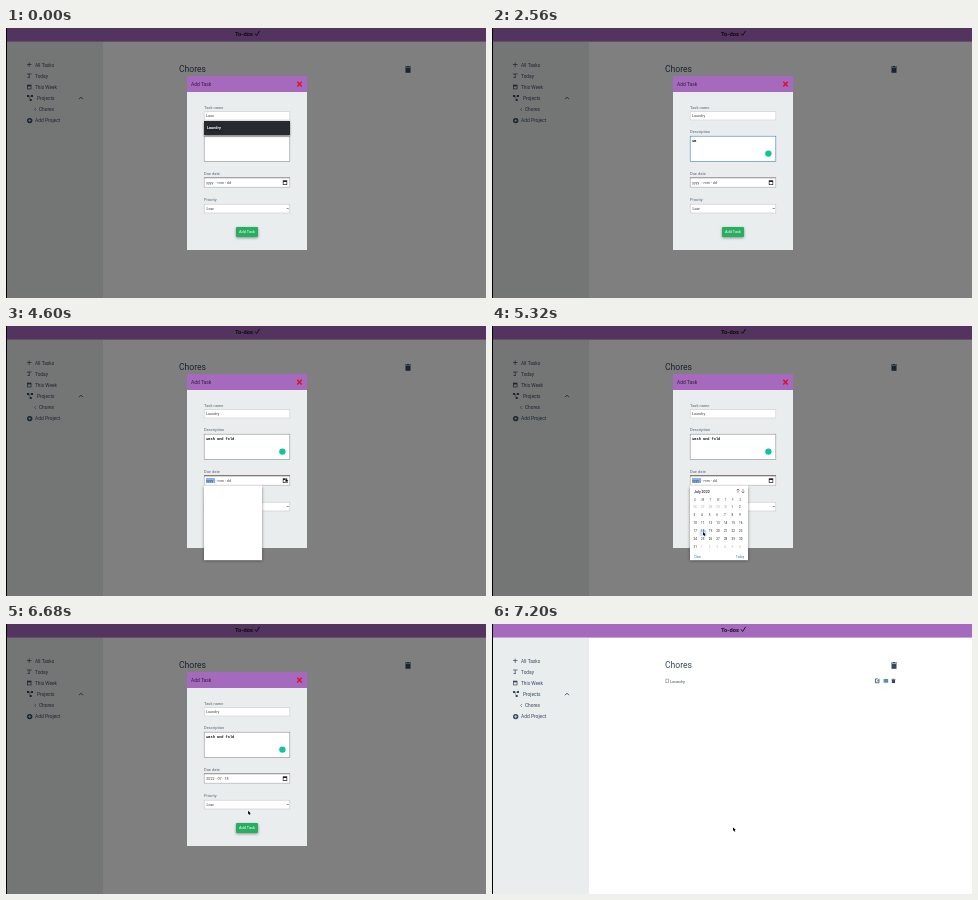
Recreate the animation shown at these times as an HTML page with a canvas. Size 480x270 px, loop 8000 ms.

```html
<!DOCTYPE html>
<html lang="en">
<head>
<meta charset="utf-8">
<title>Task list</title>
<style>
html, body { margin: 0; width: 100%; height: 100%; overflow: hidden; background: #fff; }
canvas { display: block; width: 480px; height: 270px; }
</style>
</head>
<body>
<canvas id="stage" width="480" height="270"></canvas>
<script>
const LOOP = 8000, SUBMIT = 7200;
const PURPLE = '#a569bd', PANEL = '#eaeded', INK = '#34495e', GREEN = '#27ae60';
const SANS = 'Roboto, Arial, sans-serif', MONO = '"Liberation Mono", monospace';
const ctx = document.getElementById('stage').getContext('2d');

function rect(x, y, w, h, color) {
  ctx.fillStyle = color;
  ctx.fillRect(x, y, w, h);
}

function text(str, x, y, size, color = INK, weight = 400, family = SANS) {
  ctx.font = `${weight} ${size}px ${family}`;
  ctx.fillStyle = color;
  ctx.fillText(str, x, y);
}

function path(d, color, width = 0, x = 0, y = 0) {
  ctx.save();
  ctx.translate(x, y);
  const p = new Path2D(d);
  ctx.lineWidth = width;
  ctx.strokeStyle = ctx.fillStyle = color;
  if (width) ctx.stroke(p); else ctx.fill(p);
  ctx.restore();
}

function dot(x, y, r, color) {
  ctx.beginPath();
  ctx.arc(x, y, r, 0, 7);
  ctx.fillStyle = color;
  ctx.fill();
}

function shadowed(blur, dy, alpha, draw) {
  ctx.save();
  ctx.shadowColor = `rgba(0,0,0,${alpha})`;
  ctx.shadowBlur = blur;
  ctx.shadowOffsetY = dy;
  draw();
  ctx.restore();
}

function trash(x, y, s, color) {
  rect(x, y, 6 * s, s, color);
  rect(x + 2 * s, y - .5 * s, 2 * s, s, color);
  rect(x + .5 * s, y + 1.5 * s, 5 * s, 4.8 * s, color);
}

function calendarIcon(x, y, color, paper) {
  rect(x, y, 4.4, 4.6, color);
  rect(x + .7, y + 1.7, 3, 2.2, paper);
}

function page(done) {
  rect(0, 0, 480, 270, '#fff');
  rect(0, 14, 97, 256, PANEL);
  rect(0, 0, 480, 13.6, PURPLE);
  text('To-dos', 229, 8, 5.8, '#1c1522', 700);
  path('M249 5.5l1.6 2l3-4.6', '#1c1522', 1);

  ['All Tasks', 'Today', 'This Week', 'Projects'].forEach((s, i) =>
    text(s, i === 3 ? 31 : 29, 38.7 + i * 11.1, 4.8));
  text('Chores', 33, 83.2, 4.8);
  text('Add Project', 29, 94.4, 4.9);

  path('M21 36.5h4.5M23.2 34.5v4.5', INK, .7);
  path('M21 46h4.5M23.2 46v4M21.5 49.5h2', INK, .7);
  calendarIcon(21, 56.7, INK, PANEL);
  path('M22 68.2h4M22.5 68.2l2 3.5', INK, .5);
  for (const [x, y] of [[21, 67], [25, 67], [23.7, 71]]) rect(x, y, 2, 2, INK);
  path('M73 71.2l2-2l2 2', INK, .9);
  path('M30 80l-1.5 1.5l1.5 1.5', INK, .5);
  dot(23.7, 92.6, 2.7, INK);
  path('M22.2 92.6h3M23.7 91.1v3', PANEL, .7);

  text('Chores', 173, 44, 8.6);
  trash(399, 38.5, 1, INK);
  if (done) {
    path('M173.8 55.2h2.8v3.3h-2.8z', '#667', .5);
    text('Laundry', 178, 58.5, 4.2);
    path('M387 56v2.8h-3.6v-3.9h2.4', INK, .8);
    path('M385 57.5l2.5-2.7', INK, .9);
    rect(391.6, 55, 4.6, 3.7, '#4f8fc0');
    trash(399.5, 55, .65, INK);
  }
}

function field(y, h, border = '#b5b8b9', fill = '#fff') {
  rect(198, y, 86, h, fill);
  ctx.strokeStyle = border;
  ctx.lineWidth = .6;
  ctx.strokeRect(198.2, y + .2, 85.6, h - .4);
}

function modal(t) {
  const suggesting = t < 480;
  rect(181, 48, 120, 174, PANEL);
  rect(181, 48, 120, 16, PURPLE);
  text('Add Task', 185, 57.8, 4.9, '#2c1d35');
  path('M291.3 53.8l4.4 4.6M295.7 53.8l-4.4 4.6', '#e01020', 1.4);

  const labels = { 'Task name': 80.6, 'Description': 105.4, 'Due date': 146.6, 'Priority': 172.6 };
  for (const s in labels) text(s, 198, labels[s], 4, '#566573');

  const filled = t >= 480 && t < 2320;
  field(83.5, 8.7, '#c8cccd', filled ? '#f1f6fe' : '#fff');
  text(suggesting ? 'Laun' : 'Laundry', 200, 89.2, 3.7, '#444');

  const writing = t > 1640 && t < 4320;
  field(108, 25.5, writing ? '#3f7fc4' : '#898d8f');
  const note = 'Wash and fold'.slice(0, Math.max(0, Math.floor((t - 2320) / 100)));
  text(note, 200.2, 114.3, 3.6, '#111', 700, MONO);
  if (writing && t < 3700 && t % 1000 < 500) rect(200.2 + note.length * 2.16, 111, .4, 4, '#222');
  if (t > 2420) dot(276.4, 125.6, 3.2, '#15c39a');

  const dating = t > 4320 && t < 6240;
  const picked = t > 5400;
  field(149.6, 9.8, '#a5a5a8');
  rect(198, 149.4, 86, .8, dating ? '#5b4048' : '#94878b');
  if (dating) rect(200, 152, 9, 5, '#86b5ef');
  text(picked ? '2022' : 'yyyy', 200.3, 156, 3.7, '#444');
  text(picked ? '- 07 - 18' : '- mm - dd', 209.6, 156, 3.7, '#444');
  calendarIcon(276.8, 152.3, '#222', '#fff');

  field(176, 9.2, '#c0c4c5');
  text('Low', 200.5, 182, 3.9, '#333');
  path('M280.7 180l1 1l1-1', '#333', .6);

  button(Math.min(1, Math.max(0, (t - 6760) / 200)));

  if (suggesting) shadowed(2, .5, .5, () => {
    rect(198, 93, 86, 14, '#26292e');
    text('Laundry', 201, 101.2, 3.8, '#fff', 700);
  });
  if (t > 4440 && t < 5440) datePicker(t);
}

function button(hover) {
  const k = 1 + hover * .1;
  ctx.save();
  ctx.translate(241, 204);
  ctx.scale(k, k);
  shadowed(3 + hover, 1, .4, () => {
    ctx.beginPath();
    ctx.roundRect(-11, -5, 22, 10, 1);
    ctx.fillStyle = GREEN;
    ctx.fill();
  });
  text('Add Task', -8.1, 1.4, 3.9, '#fff');
  ctx.restore();
}

function datePicker(t) {
  shadowed(3, 1, .5, () => rect(198, 159.5, 58, 74.7, '#fff'));
  if (t < 4640) return;
  text('July 2022', 202, 167, 3.6, '#222', 500);
  path('M246 167v-4M244.5 164.5l1.5-1.5l1.5 1.5M251 163v4M249.5 165.5l1.5 1.5l1.5-1.5', '#444', .5);
  [...'SMTWTFS'].forEach((d, i) => text(d, 202 + i * 7.6, 175, 3, '#555'));
  rect(207.6, 204, 7, 6, '#cfe2fb');
  for (let i = 0; i < 42; i++) {
    const day = i - 4, inMonth = day > 0 && day < 32;
    const label = day < 1 ? day + 30 : day > 31 ? day - 31 : day;
    text(label, 201.5 + i % 7 * 7.6, 181.5 + Math.floor(i / 7) * 8.1, 3, inMonth ? '#222' : '#aaa');
  }
  text('Clear', 202, 231.5, 3, '#1a73e8');
  text('Today', 244, 231.5, 3, '#1a73e8');
}

// Pointer keys: time, x, y
const moves = [
  [1200, 213, 97], [1440, 216, 107], [1720, 213, 108], [2100, 213, 108],
  [3760, 223, 128], [4280, 279.5, 152.5], [4760, 279.5, 152.5], [5260, 211, 206],
  [5440, 211, 206], [5920, 242.5, 179.5], [6520, 242.5, 179.5], [6960, 241, 203.5], [LOOP, 241, 203.5]
];

function pointer(t) {
  if (t < 1200 || t > 2100 && t < 3760) return;
  const i = moves.findIndex(m => m[0] > t);
  const [t0, x0, y0] = moves[i - 1], [t1, x1, y1] = moves[i];
  const u = (t - t0) / (t1 - t0), e = u * u * (3 - 2 * u);
  const x = x0 + (x1 - x0) * e, y = y0 + (y1 - y0) * e;
  const arrow = 'M0 0v3.6l.9-.8l.7 1.4l.7-.3l-.6-1.3h1.2z';
  path(arrow, '#fff', .7, x, y);
  path(arrow, '#000', 0, x, y);
}

function frame(now) {
  const t = now % LOOP, done = t >= SUBMIT;
  page(done);
  if (!done) {
    rect(0, 0, 480, 270, 'rgba(0,0,0,.5)');
    modal(t);
  }
  rect(0, 0, 1, 270, '#000');
  pointer(t);
  requestAnimationFrame(frame);
}
requestAnimationFrame(frame);
</script>
</body>
</html>
```
